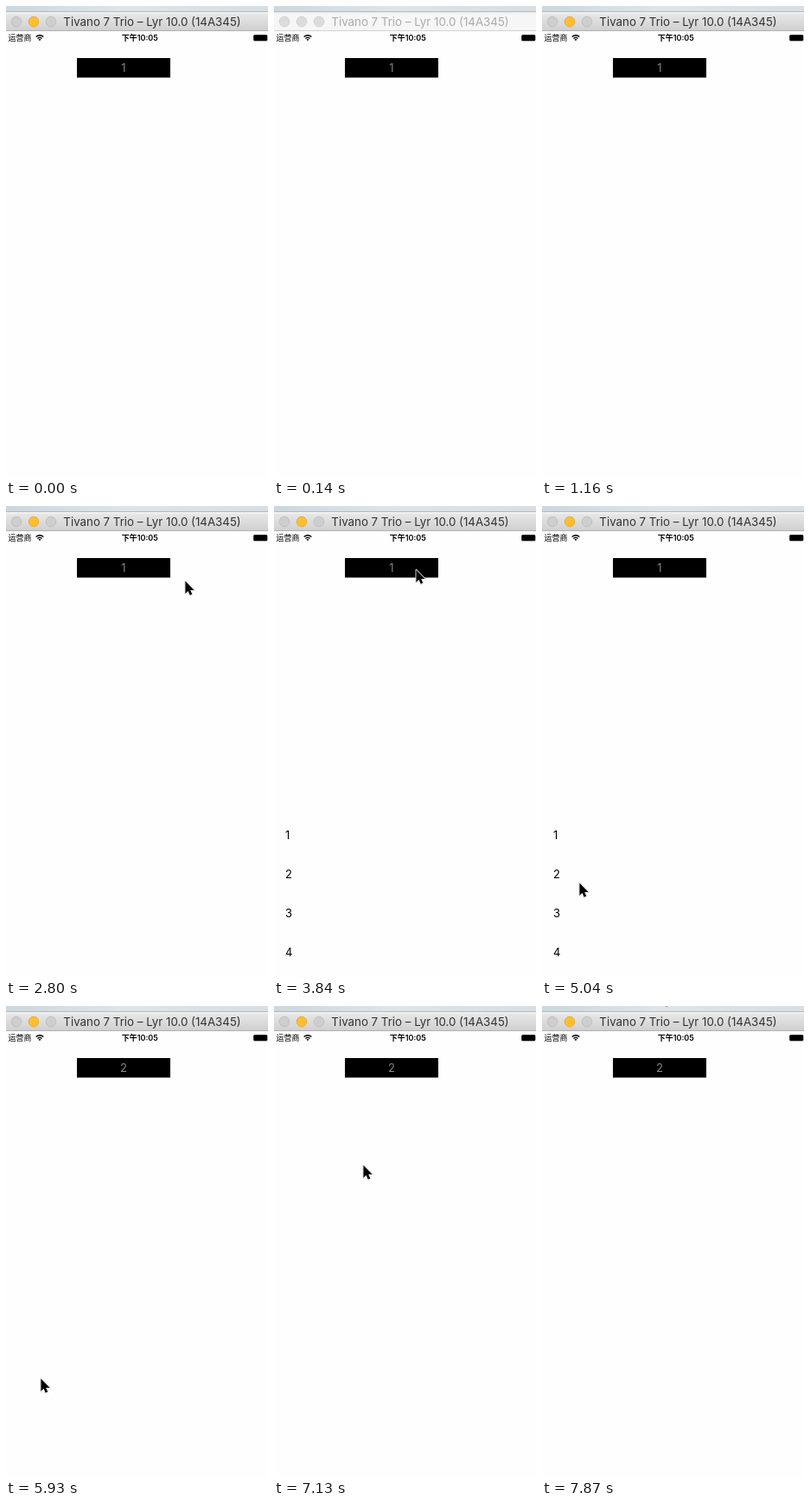
These frames come from a looping animation (303 by 544 pixels, 8 s). An HTML page:

```html
<!DOCTYPE html>
<html lang="zh">
<head>
<meta charset="utf-8">
<title>Simulator dropdown</title>
<style>
  html, body { margin: 0; width: 100%; height: 100%; overflow: hidden; background: #fefefe; }
  svg { display: block; width: 100%; height: 100%; }
  text { font-family: Inter, "Noto Sans CJK SC", "Noto Sans CJK", sans-serif; }
  #cursor { paint-order: stroke; filter: drop-shadow(0 .7px .6px rgba(0, 0, 0, .4)); }
</style>
</head>
<body>
<svg viewBox="0 0 303 544">
  <defs>
    <linearGradient id="sky">
      <stop offset="0" stop-color="#ccd7de"/>
      <stop offset=".45" stop-color="#dde5e9"/>
      <stop offset="1" stop-color="#d7dfe4"/>
    </linearGradient>
    <linearGradient id="bar" x2="0" y2="1">
      <stop offset="0" stop-color="#e8e7e8"/>
      <stop offset="1" stop-color="#d1d0d1"/>
    </linearGradient>
  </defs>

  <rect width="303" height="544" fill="#fefefe"/>
  <rect width="303" height="7" fill="url(#sky)"/>
  <rect y="6" width="303" height="1" fill="#b4babe"/>
  <rect y="7" width="303" height="2" fill="#f0f0f0"/>
  <rect id="titlebar" y="9" width="303" height="19"/>
  <rect id="edge" y="28" width="303" height="1"/>
  <g id="lights" stroke-width=".8"></g>
  <text id="title" x="169" y="23" font-size="13.3" text-anchor="middle">Tivano 7 Trio – Lyr 10.0 (14A345)</text>

  <text x="2.5" y="40" font-size="9">运营商</text>
  <g fill="none" stroke="#000" stroke-width="1.3">
    <path d="M34.6 35.6Q39 31.8 43.4 35.6"/>
    <path d="M36.4 37.5Q39 35.3 41.6 37.5"/>
  </g>
  <path d="M37.5 38.6Q39 37.6 40.5 38.6L39 40.2Z"/>
  <text x="154.7" y="40" font-size="9" font-weight="600" text-anchor="middle">下午10:05</text>
  <rect x="286.5" y="33.5" width="15.5" height="6.5" rx="1" stroke="#000" stroke-opacity=".6"/>

  <rect x="82" y="60" width="108" height="22.5"/>
  <text id="value" x="136" y="76" font-size="13" fill="#858585" text-anchor="middle">1</text>
  <g id="list" font-size="13"></g>
  <path id="cursor" d="M1.4 .6V15L4.6 12L6.7 16.8L9.3 15.7L7.2 11H11.7Z"
        stroke="#fff" stroke-width="1.6" stroke-linejoin="round"/>
</svg>
<script>
const LOOP = 8000, STEP = 148, OPEN = 3690, PICK = 5780, DROP = 170;
const $ = id => document.getElementById(id);

function set(el, attrs) {
  for (const k in attrs) el.setAttribute(k, attrs[k]);
}
function add(parent, tag, attrs, text = "") {
  const el = document.createElementNS("http://www.w3.org/2000/svg", tag);
  set(el, attrs);
  el.textContent = text;
  parent.append(el);
  return el;
}

const lights = [0, 1, 2].map(i => add($("lights"), "circle", { cx: 12 + 20 * i, cy: 18, r: 5.8 }));
for (let i = 0; i < 4; i++) add($("list"), "text", { x: 13, y: 383.5 + 45 * i }, i + 1);

const easeOut = p => Math.sin(p * Math.PI / 2);
const easeInOut = p => (1 - Math.cos(p * Math.PI)) / 2;

// the screen refreshes in coarse steps; the first one lands at the start time
function progress(t, start, steps) {
  if (t < start) return 0;
  return Math.min(1, (Math.floor((t - start) / STEP) + 1) / steps);
}

const moves = [
  { start: 2800, steps: 1, x: 206, y: 86, ease: easeOut },
  { start: 3100, steps: 3, x: 163, y: 73, ease: easeOut },
  { start: 4140, steps: 7, x: 42, y: 434, ease: easeInOut },
  { start: 5190, steps: 2, x: 39, y: 429, ease: easeOut },
  { start: 7130, steps: 1, x: 102, y: 183, ease: easeOut },
  { start: 7130 + STEP, steps: 5, x: 137, y: -16, ease: easeOut }
];

function pointer(t) {
  let x = -40, y = -40;
  for (const m of moves) {
    const p = m.ease(progress(t, m.start, m.steps));
    x += (m.x - x) * p;
    y += (m.y - y) * p;
  }
  return [x, y];
}

function listShift(t) {
  const hidden = (1 - progress(t, OPEN, 2)) ** 3;
  return DROP * (hidden + progress(t, PICK, 2));
}

function drawWindow(active) {
  set($("titlebar"), { fill: active ? "url(#bar)" : "#f6f6f6" });
  set($("edge"), { fill: active ? "#b1b0b1" : "#d1d1d1" });
  set($("title"), { fill: active ? "#333" : "#ababab" });
  lights.forEach((c, i) => {
    const lit = active && i === 1;
    set(c, {
      fill: lit ? "#fdbe2f" : active ? "#cfcecf" : "#dcdcdc",
      stroke: lit ? "#e5a625" : active ? "#bbbabb" : "#cbcbcb"
    });
  });
}

function draw(t) {
  drawWindow(t < 140 || t >= 1160);
  $("value").textContent = t < PICK ? 1 : 2;
  set($("list"), { transform: `translate(0 ${listShift(t)})` });
  set($("cursor"), { transform: `translate(${pointer(t)})` });
}

const start = performance.now();
function tick() {
  draw((performance.now() - start) % LOOP);
  requestAnimationFrame(tick);
}
tick();
</script>
</body>
</html>
```
